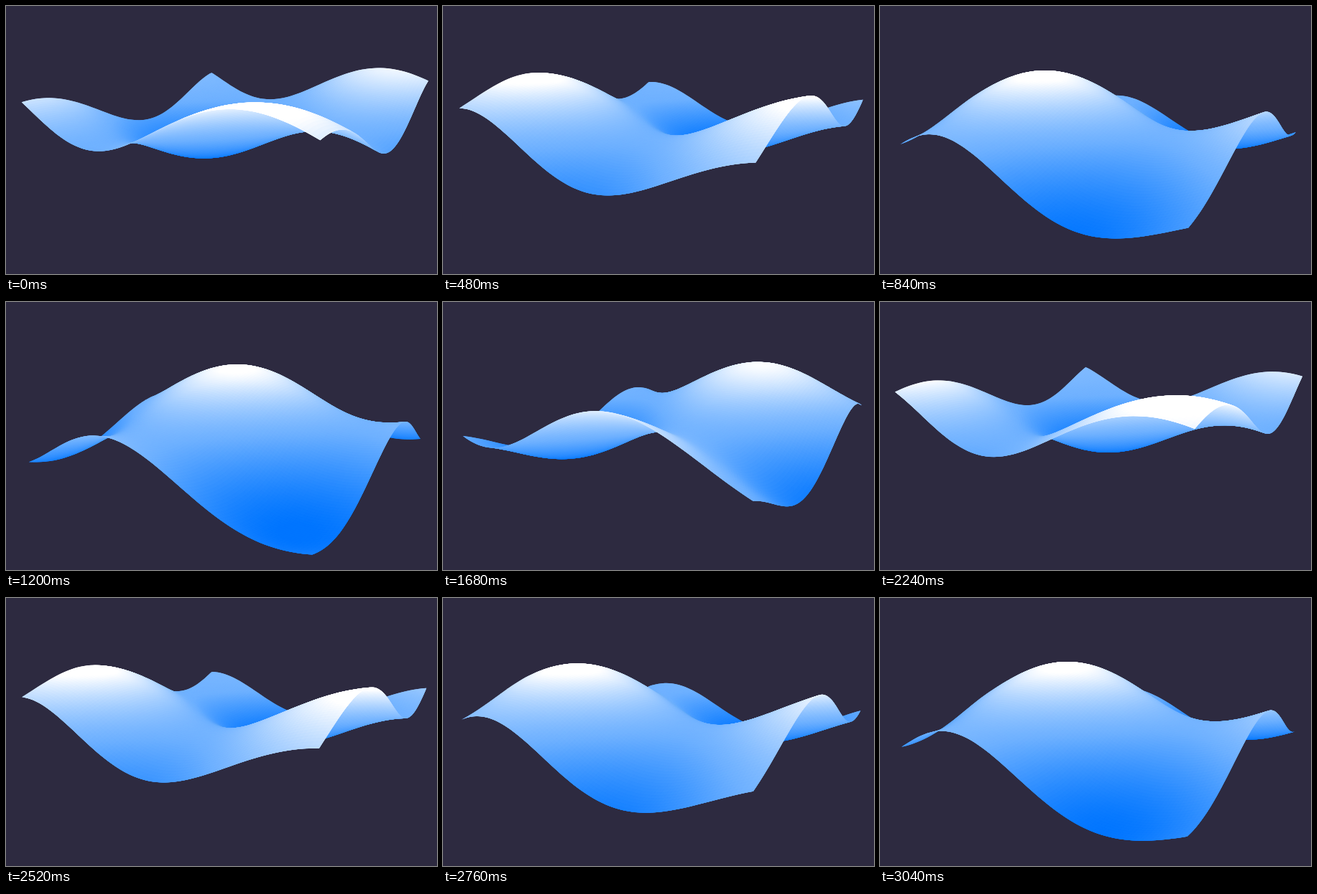
Recreate the animation shown at these times as an HTML page with a canvas. Size 600x374 px, loop 3.08 s.

```html
<!DOCTYPE html>
<html lang="en">
<head>
<meta charset="utf-8">
<title>Waving sheet</title>
<style>
  html, body { margin: 0; width: 100%; height: 100%; overflow: hidden; background: #2d2a40; }
  canvas { display: block; width: 600px; height: 374px; }
</style>
</head>
<body>
<canvas id="stage" width="600" height="374"></canvas>
<script>
const ctx = document.getElementById('stage').getContext('2d');
const LOOP = 3080, STEP = 40, PERIOD = 2080;
const CELLS = 100;

// Homogeneous screen vectors: left corner, the two sides, and one unit of sinking.
const ORIGIN = [27, 181, 1];
const SIDE_U = [227.5, -17.4, -0.41];
const SIDE_V = [424.5, 14.8, 0.577];
const DOWN = [6.8, 59.3, 0.0239];

const clamp = (x, lo, hi) => Math.min(hi, Math.max(lo, x));

// Two crossing waves; the second is a little calmer along the front edge.
function sinkAt(u, v, phase) {
  const swell = 0.55 + 0.085 * (1 - Math.exp(-6 * v));
  return -0.1 - 0.63 * Math.cos(phase - 1.257 - 6.05 * u) - swell * Math.cos(phase + 0.18 - 6 * v);
}

function project(u, v, phase) {
  const s = sinkAt(u, v, phase);
  const [x, y, w] = ORIGIN.map((o, i) => o + SIDE_U[i] * u + SIDE_V[i] * v + DOWN[i] * s);
  return { x: x / w, y: y / w, light: lightness(s, w) };
}

// Crests turn white, less so far away; hollows turn blue.
function lightness(s, w) {
  const rise = Math.max(0, -s);
  const nearness = clamp(1 + (1.2 - w) * 2.2, 0.1, 1.3);
  const light = s > 0 ? 0.43 - 0.39 * s : 0.43 + rise * (0.2 + 0.15 * rise) * nearness;
  return clamp(light, 0, 1);
}

const shade = t => `rgb(${Math.round(255 * t)},${Math.round(117 + 138 * t)},255)`;

function fillQuad(points, color) {
  ctx.fillStyle = color;
  ctx.beginPath();
  for (const p of points) ctx.lineTo(p.x, p.y);
  ctx.fill();
}

function draw(time) {
  const phase = 2 * Math.PI * time / PERIOD;
  ctx.fillStyle = '#2d2a40';
  ctx.fillRect(0, 0, 600, 374);
  const grid = Array.from({ length: CELLS + 1 }, (_, j) =>
    Array.from({ length: CELLS + 1 }, (_, i) => project(i / CELLS, j / CELLS, phase)));
  // Back to front; each cell reaches under its nearer neighbours so that no seams show.
  for (let j = CELLS; j > 0; j--) {
    const far = grid[j], near = grid[Math.max(0, j - 2)];
    for (let i = 0; i < CELLS; i++) {
      const next = Math.min(CELLS, i + 2);
      const light = (far[i].light + grid[j - 1][i + 1].light) / 2;
      fillQuad([far[i], far[next], near[next], near[i]], shade(light));
    }
  }
}

const start = performance.now();
let shown = -1;
function tick() {
  const time = Math.floor(((performance.now() - start) % LOOP) / STEP) * STEP;
  if (time !== shown) draw(shown = time);
  requestAnimationFrame(tick);
}
tick();
</script>
</body>
</html>
```
